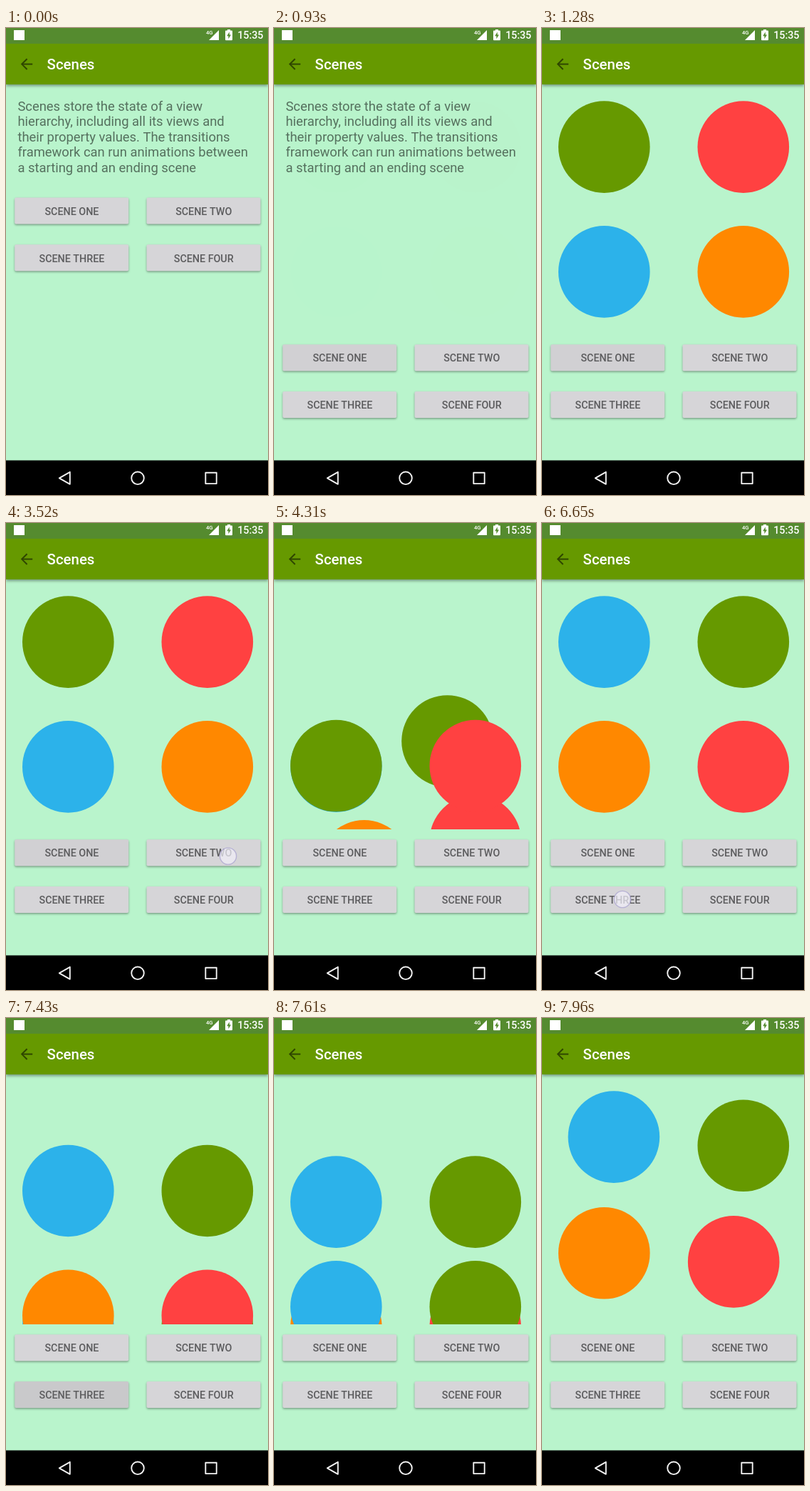
Recreate the animation shown at these times as an HTML page with a canvas. Size 368x654 px, loop 8000 ms.

```html
<!DOCTYPE html>
<html lang="en">
<head>
<meta charset="utf-8">
<title>Scenes</title>
<style>
  html, body { margin: 0; width: 100%; height: 100%; overflow: hidden; background: #b9f4cc; }
  canvas { display: block; width: 368px; height: 654px; }
</style>
</head>
<body>
<canvas id="stage"></canvas>
<script>
const W = 368, H = 654, LOOP = 8000;
const canvas = document.getElementById('stage');
const ctx = canvas.getContext('2d');
const ratio = window.devicePixelRatio || 1;
canvas.width = W * ratio;
canvas.height = H * ratio;

const GREEN = '#669900', RED = '#ff4141', ORANGE = '#ff8800', BLUE = '#2cb2ea';
const DISCS = [GREEN, RED, ORANGE, BLUE];
// Corners in clockwise order from the top left.
const CORNERS = [[87.3, 166.6], [282.8, 166.6], [282.8, 341.4], [87.3, 341.4]];
const RADIUS = 64.3, SCENE_TOP = 79, SCENE_BOTTOM = 429, SCENE_HEIGHT = 350;

const FADE_START = 920, FADE_TIME = 330, LAYOUT_TIME = 930;
const MOVE_TIME = 500, ENTER_DELAY = 167;
const SLIDES = [
  { start: 3959, turnDelay: 0 },
  { start: 7199, turnDelay: 677 }
];
const TOUCHES = [
  { from: 500, to: 580, x: 113, y: 258 },
  { from: 3520, to: 3610, x: 312, y: 466.5 },
  { from: 6650, to: 6740, x: 113, y: 527 }
];
const INTRO = [
  'Scenes store the state of a view',
  'hierarchy, including all its views and',
  'their property values. The transitions',
  'framework can run animations between',
  'a starting and an ending scene'
];
const LABELS = ['SCENE ONE', 'SCENE TWO', 'SCENE THREE', 'SCENE FOUR'];

const ramp = (t, start, time) => Math.min(1, Math.max(0, (t - start) / time));
const ease = p => (1 - Math.cos(Math.PI * p)) / 2;
const within = (t, from, to) => t >= from && t < to;

function text(string, x, y, size, color, weight = 400, align = 'left') {
  ctx.font = `${weight} ${size}px Roboto, sans-serif`;
  ctx.textAlign = align;
  ctx.fillStyle = color;
  ctx.fillText(string, x, y);
}

function path(points, closed) {
  ctx.beginPath();
  points.forEach(([x, y]) => ctx.lineTo(x, y));
  if (closed) ctx.closePath();
}

function circle(x, y, r) {
  ctx.beginPath();
  ctx.arc(x, y, r, 0, Math.PI * 2);
}

// A turn of 1 moves every disc one corner clockwise.
function discs(turn, shift) {
  const step = Math.floor(turn), part = turn - step;
  DISCS.forEach((color, i) => {
    const [x0, y0] = CORNERS[(i + step) % 4];
    const [x1, y1] = CORNERS[(i + step + 1) % 4];
    circle(x0 + (x1 - x0) * part, y0 + (y1 - y0) * part + shift, RADIUS);
    ctx.fillStyle = color;
    ctx.fill();
  });
}

function scene(t) {
  ctx.save();
  ctx.beginPath();
  ctx.rect(0, SCENE_TOP, W, SCENE_BOTTOM - SCENE_TOP);
  ctx.clip();
  const shown = ease(ramp(t, FADE_START, FADE_TIME));
  if (shown < 1) {
    ctx.globalAlpha = 1 - shown;
    INTRO.forEach((line, i) => text(line, 16.4, 115.6 + i * 21.6, 18.4, 'rgba(0,0,0,.54)'));
  }
  ctx.globalAlpha = shown;
  const index = t < SLIDES[1].start ? 0 : 1;
  const { start, turnDelay } = SLIDES[index];
  if (t < start) {
    discs(index, 0);
  } else {
    const leave = ramp(t, start, MOVE_TIME);
    const enter = ramp(t, start + ENTER_DELAY, MOVE_TIME);
    const turn = ease(ramp(t, start + turnDelay, MOVE_TIME));
    discs(index + turn, SCENE_HEIGHT * (1 - enter) ** 2);
    if (leave < 1) discs(index, SCENE_HEIGHT * leave ** 2);
  }
  ctx.restore();
}

function pressTint(i, t) {
  if (i === 0) return within(t, 580, 3960) ? 0.025 : 0;
  if (i === 1) return within(t, 3610, 3960) ? 0.02 : 0;
  if (i === 2) return 0.06 * ramp(t, 6740, 450) * (1 - ramp(t, 7450, 150));
  return 0;
}

function buttons(t) {
  const top = t < LAYOUT_TIME ? 237.6 : 443.2;
  const lifted = [within(t, 580, 930), within(t, 3610, 3960), within(t, 6740, 7200)];
  LABELS.forEach((label, i) => {
    const x = i % 2 ? 197.5 : 12.2;
    const y = top + (i > 1 ? 65.7 : 0);
    ctx.save();
    ctx.shadowColor = 'rgba(0,0,0,.36)';
    ctx.shadowBlur = (lifted[i] ? 4.5 : 3) * ratio;
    ctx.shadowOffsetY = (lifted[i] ? 2.2 : 1.5) * ratio;
    ctx.beginPath();
    ctx.roundRect(x, y, 160, 37, 2);
    ctx.fillStyle = '#d6d5d8';
    ctx.fill();
    ctx.restore();
    ctx.fillStyle = `rgba(0,0,0,${pressTint(i, t)})`;
    ctx.fill();
    text(label, x + 80.2, y + 24.2, 14.3, '#5c5c5e', 500, 'center');
  });
}

function statusBar() {
  ctx.fillStyle = '#558b2f';
  ctx.fillRect(0, 0, W, 22);
  ctx.fillStyle = '#fff';
  ctx.fillRect(11, 3, 15, 14);
  text('4G', 281, 9, 7.6, '#fff', 500);
  path([[299, 3], [299, 17], [285, 17]], true);
  ctx.fill();
  ctx.beginPath();
  ctx.roundRect(308, 3.6, 10, 13.6, 1);
  ctx.rect(311, 2, 4, 2);
  ctx.fill();
  path([[313.8, 5.5], [310.2, 11.2], [312.4, 11.2], [312.4, 15.2], [316, 9.5], [313.8, 9.5]], true);
  ctx.fillStyle = '#558b2f';
  ctx.fill();
  text('15:35', 325.2, 15.2, 14.3, '#fff', 500);
}

function appBar() {
  ctx.save();
  ctx.shadowColor = 'rgba(0,0,0,.4)';
  ctx.shadowBlur = 4 * ratio;
  ctx.shadowOffsetY = 1.5 * ratio;
  ctx.fillStyle = GREEN;
  ctx.fillRect(0, 22, W, 57);
  ctx.restore();
  ctx.strokeStyle = '#2f4600';
  ctx.lineWidth = 2;
  ctx.lineCap = 'butt';
  ctx.lineJoin = 'miter';
  path([[29.6, 43.2], [22.2, 50.6], [29.6, 58]]);
  ctx.stroke();
  path([[22.2, 50.6], [37.2, 50.6]]);
  ctx.stroke();
  text('Scenes', 57.6, 58.2, 20.4, '#fff', 500);
}

function navBar() {
  ctx.fillStyle = '#000';
  ctx.fillRect(0, 605.5, W, H - 605.5);
  ctx.strokeStyle = '#f2f2f2';
  ctx.lineWidth = 1.9;
  ctx.lineJoin = 'round';
  path([[74.8, 630.3], [89.8, 621.8], [89.8, 638.8]], true);
  ctx.stroke();
  circle(185, 630.3, 8.8);
  ctx.stroke();
  ctx.strokeRect(280.3, 622.7, 15.4, 15.4);
}

function touch(t) {
  const spot = TOUCHES.find(({ from, to }) => within(t, from, to));
  if (!spot) return;
  circle(spot.x, spot.y, 11.6);
  ctx.fillStyle = 'rgba(240,238,248,.72)';
  ctx.fill();
  ctx.strokeStyle = 'rgba(172,166,208,.8)';
  ctx.lineWidth = 1.4;
  ctx.stroke();
}

function draw(t) {
  ctx.setTransform(ratio, 0, 0, ratio, 0, 0);
  ctx.fillStyle = '#b9f4cc';
  ctx.fillRect(0, 0, W, H);
  scene(t);
  buttons(t);
  appBar();
  statusBar();
  navBar();
  touch(t);
}

const began = performance.now();
function frame() {
  draw((performance.now() - began) % LOOP);
  requestAnimationFrame(frame);
}
frame();
</script>
</body>
</html>
```
